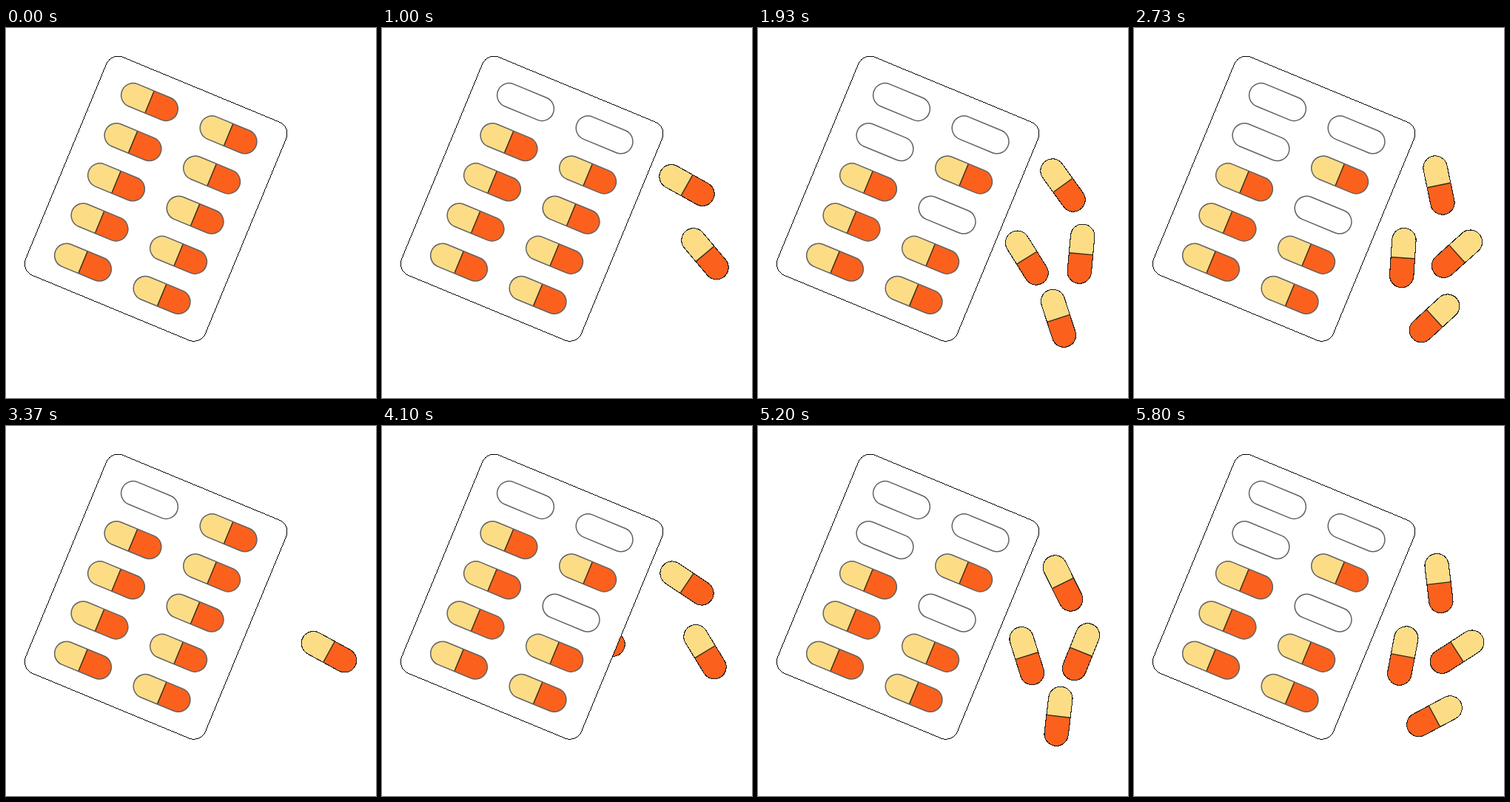
These frames come from a looping animation (500x500 px, 5830 ms). An HTML page:

```html
<!DOCTYPE html>
<html lang="en">
<head>
<meta charset="utf-8">
<title>Capsules</title>
<style>
  html, body { margin: 0; width: 100%; height: 100%; overflow: hidden; background: #fff; }
  svg { display: block; width: 100vw; height: 100vh; }
  .yellow { fill: #fcdd86; }
  .orange { fill: #fb611c; }
  .line { fill: none; stroke: #626262; stroke-width: 1.5; }
  .split { stroke: #3a2a18; stroke-width: 1.4; }
  .loose .line { stroke: #1c1c1c; stroke-width: 1.1; shape-rendering: crispEdges; }
  .loose .split { stroke: #1c1c1c; stroke-width: 1.2; }
  .sheet { fill: #fff; stroke: #000; stroke-width: 1; shape-rendering: crispEdges; }
</style>
</head>
<body>
<svg id="stage" viewBox="0 0 500 500">
  <defs>
    <g id="fill">
      <path class="yellow" d="M0-16.2H-24A16.2 16.2 0 0 0-24 16.2H0Z"/>
      <path class="orange" d="M0-16.2H24A16.2 16.2 0 0 1 24 16.2H0Z"/>
      <path class="split" d="M0-16.2V16.2"/>
    </g>
    <rect id="outline" x="-40.2" y="-16.2" width="80.4" height="32.4" rx="16.2"/>
  </defs>
  <g id="loose" class="loose"></g>
  <rect class="sheet" x="-131.5" y="-159.6" width="263" height="319.2" rx="17"
        transform="translate(202.6 230.7) rotate(22.5)"/>
  <g id="slots"></g>
</svg>
<script>
const TILT = 22.5;
const LOOP = 5830, ROUND = 2930, HOLD = 170;
const ROW = { x: -22.5, y: 54.15 };
const COLUMNS = [{ x: 194, y: 100 }, { x: 300.6, y: 144.3 }];

// Each pill flies to its spot, then keeps turning until the round ends.
const PILLS = [
  { col: 0, row: 0, to: { x: 436.5, y: 305.2 }, leave: 170, land: 400, turn: 127, bend: 1.24 },
  { col: 1, row: 0, to: { x: 412, y: 212.5 }, leave: 620, land: 940, turn: 62, bend: 1.18 },
  { col: 1, row: 2, to: { x: 406, y: 392.3 }, leave: 1080, land: 1470, turn: 133, bend: 1.27 },
  { col: 0, row: 1, to: { x: 363.3, y: 310.6 }, leave: 1250, land: 1900, turn: 80, bend: 0.9 }
];

function add(parent, tag, attrs = {}) {
  const el = document.createElementNS("http://www.w3.org/2000/svg", tag);
  for (const name in attrs) el.setAttribute(name, attrs[name]);
  return parent.appendChild(el);
}

function addPill(parent) {
  const g = add(parent, "g");
  const fill = add(g, "use", { href: "#fill" });
  add(g, "use", { href: "#outline", class: "line" });
  return { g, fill };
}

const slotAt = (col, row) => ({
  x: COLUMNS[col].x + ROW.x * row,
  y: COLUMNS[col].y + ROW.y * row
});
const mix = (a, b, p) => a + (b - a) * p;
const progress = (t, a, b) => Math.min(1, Math.max(0, (t - a) / (b - a)));
const show = (el, on) => { el.style.display = on ? "" : "none"; };

function place(el, x, y, angle) {
  el.setAttribute("transform", `translate(${x} ${y}) rotate(${angle})`);
}

const loose = document.getElementById("loose");
const slots = document.getElementById("slots");

for (let col = 0; col < 2; col++) {
  for (let row = 0; row < 5; row++) {
    const from = slotAt(col, row);
    const { g, fill } = addPill(slots);
    place(g, from.x, from.y, TILT);
    const pill = PILLS.find(p => p.col === col && p.row === row);
    if (pill) Object.assign(pill, { from, fill, el: addPill(loose).g });
  }
}

// The loop holds two rounds; the second runs slightly faster.
function stepTime(t) {
  const second = t >= ROUND;
  const since = t - (second ? ROUND : 0) - HOLD;
  if (since < 0) return 0;
  return HOLD + 40 * Math.floor(since / (second ? 39.7 : 40));
}

function draw(t) {
  for (const { from, to, leave, land, turn, bend, fill, el } of PILLS) {
    const out = t >= leave;
    show(fill, !out);
    show(el, out);
    const p = progress(t, leave, land);
    const angle = TILT + turn * progress(t, leave, ROUND) ** bend;
    place(el, mix(from.x, to.x, p), mix(from.y, to.y, p), angle);
  }
}

const start = performance.now();
function tick() {
  draw(stepTime((performance.now() - start) % LOOP));
  requestAnimationFrame(tick);
}
tick();
</script>
</body>
</html>
```
